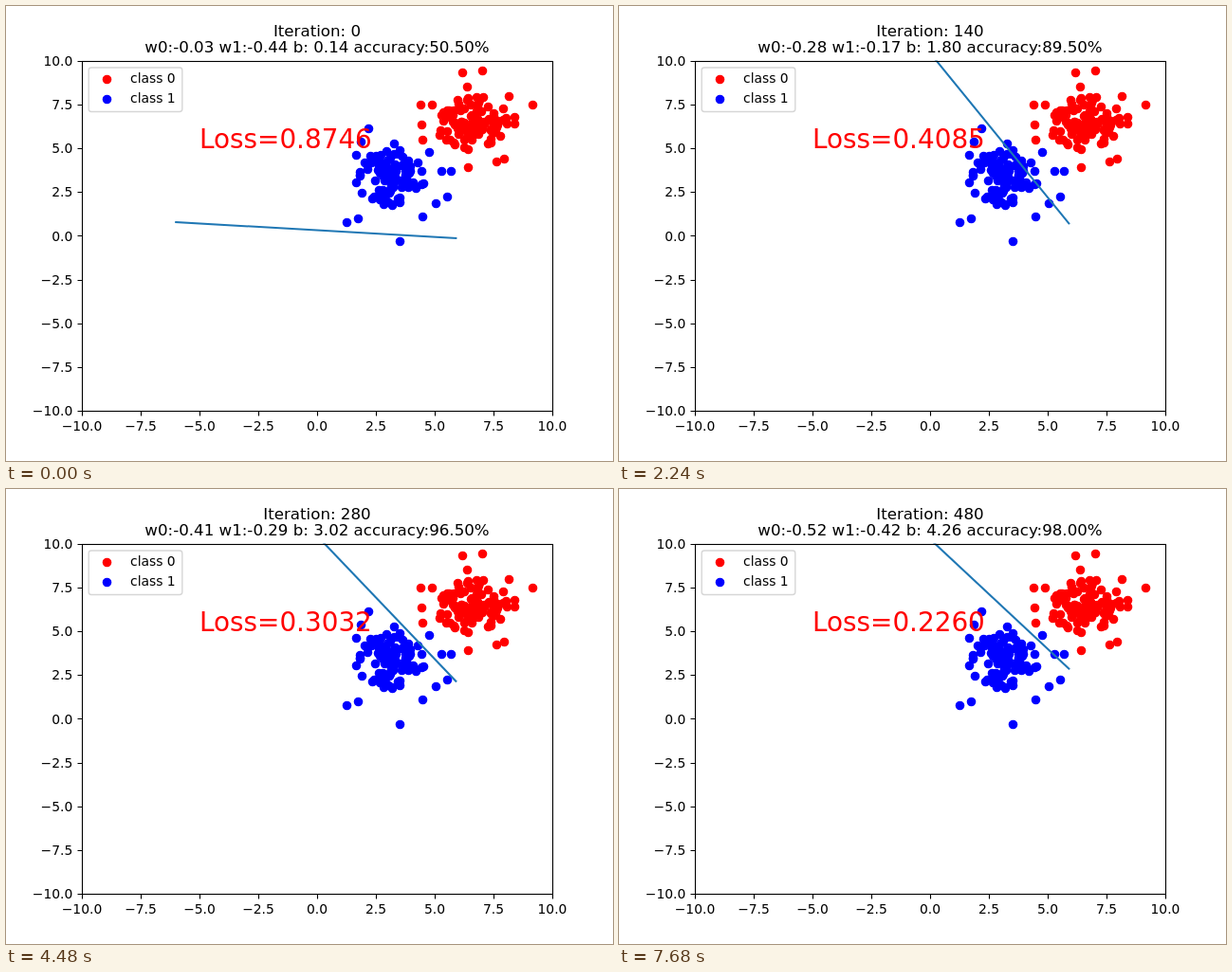
These frames come from a looping animation (640 px wide and 480 px high, 8000 ms). An HTML page:

```html
<!DOCTYPE html>
<html lang="en">
<head>
<meta charset="utf-8">
<title>Training a linear classifier</title>
<style>
html, body { margin: 0; width: 100%; height: 100%; overflow: hidden; background: #fff; }
svg { display: block; width: 100%; height: 100%; font-family: "DejaVu Sans", sans-serif; font-size: 13.89px; }
.title { font-size: 16.67px; text-anchor: middle; }
.loss { font-size: 27.85px; fill: red; }
.axis { fill: none; stroke: #000; stroke-width: 1.11; }
</style>
</head>
<body>
<svg id="stage" viewBox="0 0 640 480">
  <defs><clipPath id="area"><rect x="80" y="57.6" width="496" height="369.6"/></clipPath></defs>
</svg>
<script>
const STEP = 320, STEPS = 25, PER_STEP = 20;
const { PI, cos, sin, exp, log, round, floor } = Math;
const stage = document.getElementById('stage');
const px = x => 328 + 24.8 * x;
const py = y => 242.4 - 18.48 * y;
const snap = v => floor(v) + 0.5;

function add(tag, attrs, text) {
  const el = document.createElementNS('http://www.w3.org/2000/svg', tag);
  for (const k in attrs) el.setAttribute(k, attrs[k]);
  if (text) el.textContent = text;
  return stage.appendChild(el);
}

const dot = (x, y, fill) => add('circle', { cx: snap(x), cy: snap(y), r: 4.8, fill });

function random(seed) {
  return () => {
    seed = (seed + 0x6D2B79F5) | 0;
    let n = Math.imul(seed ^ (seed >>> 15), 1 | seed);
    n = (n + Math.imul(n ^ (n >>> 7), 61 | n)) ^ n;
    return ((n ^ (n >>> 14)) >>> 0) / 4294967296;
  };
}

// A seeded elliptical cluster plus a few stragglers
function cloud({ color, seed, cx, cy, rx, ry, tilt, strays }) {
  const rnd = random(seed);
  for (let i = 0; i < 88; i++) {
    const a = 2 * PI * rnd(), r = rnd() ** 0.6;
    const x = rx * r * cos(a);
    dot(cx + x, cy + ry * r * sin(a) + tilt * x, color);
  }
  strays.forEach(([x, y]) => dot(x, y, color));
}

cloud({
  color: 'red', seed: 12, cx: 497, cy: 120, rx: 42, ry: 31, tilt: -0.2,
  strays: [[481, 70], [502, 68], [486, 85], [449, 104], [437, 104], [438, 125],
    [439, 141], [487, 170], [517, 164], [525, 161], [555, 104], [536, 124]]
});
cloud({
  color: 'blue', seed: 5, cx: 408, cy: 181, rx: 39, ry: 30, tilt: 0,
  strays: [[382, 129], [374, 143], [369, 157], [409, 145], [446, 154], [459, 174],
    [469, 174], [465, 201], [453, 208], [439, 222], [415, 248], [371, 224], [359, 228]]
});

const line = add('path', {
  fill: 'none', stroke: '#1f77b4', 'stroke-width': 2.08,
  'stroke-linecap': 'square', 'clip-path': 'url(#area)'
});

// Axes
add('rect', { x: 80.5, y: 58.5, width: 496, height: 369, class: 'axis' });
for (let v = -10; v <= 10; v += 2.5) {
  const label = v.toFixed(1).replace('-', '\u2212');
  const x = round(px(v)) + 0.5, y = round(py(v)) + 0.5;
  add('path', { d: `M${x} 427.5v5M80.5 ${y}h-5`, class: 'axis' });
  add('text', { x: px(v), y: 448, 'text-anchor': 'middle' }, label);
  add('text', { x: 70.3, y: round(py(v) + 5.2), 'text-anchor': 'end' }, label);
}

const loss = add('text', { x: px(-5), y: 150, class: 'loss' });

// Legend
add('rect', {
  x: 87.2, y: 65, width: 98.6, height: 46.5, rx: 2.8,
  fill: '#fff', 'fill-opacity': 0.8, stroke: '#ccc', 'stroke-opacity': 0.8, 'stroke-width': 1.39
});
['red', 'blue'].forEach((color, i) => {
  dot(106, 77 + 21 * i, color);
  add('text', { x: 131, y: 81 + 21 * i }, 'class ' + i);
});

const head = add('text', { x: 328, y: 32, class: 'title' });
const info = add('text', { x: 328, y: 49, class: 'title' });

// Fitted training curves; the boundary is y = rise - slope * x
function model(it) {
  const start = exp(-((it / 64.4) ** 1.895));
  const rise = 10.7 - 0.00093 * it - 10.384 * start;
  const slope = 1.18 + 1.09 * exp(-it / 178) - 2.193 * start;
  const b = 0.139 + 3.6 * log(1 + it / 205) - 0.222 * (1 - exp(-it / 40));
  const w1 = -b / rise;
  const acc = 98.3 - 47.8 * exp(-it / 82) - 0.152 * it * start;
  const cost = 1 / (1.5467 + 0.00662 * it - 1.3e-6 * it * it - 0.4033 * exp(-it / 10));
  return { rise, slope, b, w1, w0: slope * w1, acc: round(acc * 2) / 2, cost };
}

function draw(step) {
  const it = step * PER_STEP, m = model(it);
  const y = x => py(m.rise - m.slope * x);
  line.setAttribute('d', `M${px(-6)} ${y(-6)}L${px(5.9)} ${y(5.9)}`);
  head.textContent = `Iteration: ${it}`;
  info.textContent = `w0:${m.w0.toFixed(2)} w1:${m.w1.toFixed(2)} b: ${m.b.toFixed(2)}`
    + ` accuracy:${m.acc.toFixed(2)}%`;
  loss.textContent = `Loss=${m.cost.toFixed(4)}`;
}

const begin = performance.now();
function tick() {
  const t = Math.max(0, performance.now() - begin);
  draw(floor(t / STEP) % STEPS);
  requestAnimationFrame(tick);
}
tick();
</script>
</body>
</html>
```
